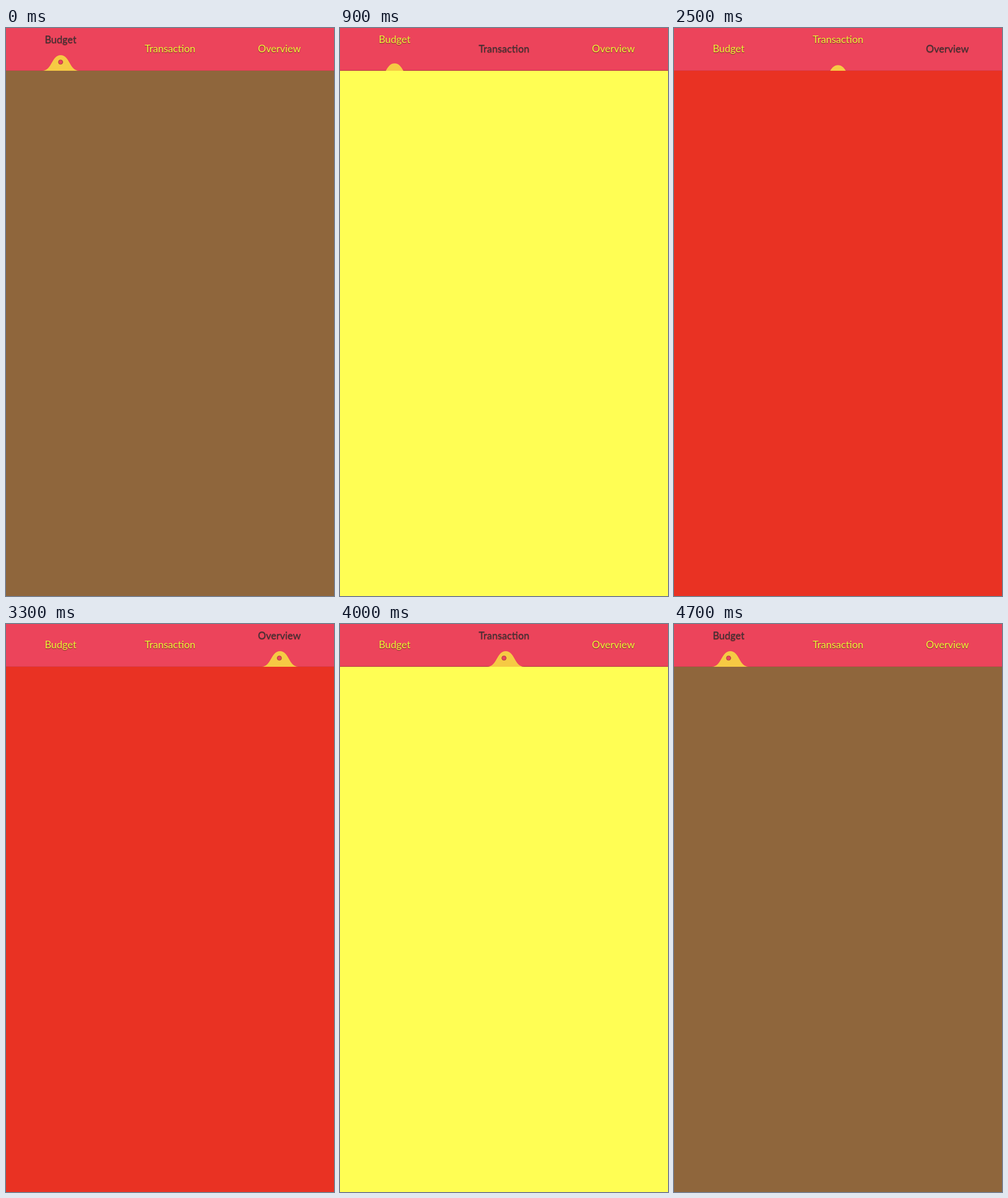
These frames come from a looping animation (569x983 px, 4.8 s). An HTML page:

```html
<!DOCTYPE html>
<html lang="en">
<head>
<meta charset="utf-8">
<title>Tab bar</title>
<style>
  html, body { margin: 0; width: 100%; height: 100%; overflow: hidden; }
  svg { display: block; width: 569px; height: 983px; }
  text {
    font: 17.5px Lato, "Open Sans", sans-serif;
    text-anchor: middle;
    text-shadow: 0 1px 1px rgba(60, 30, 10, .7);
  }
</style>
</head>
<body>
<svg viewBox="0 0 569 983">
  <clipPath id="bar"><rect width="569" height="74"/></clipPath>
  <rect id="page" width="569" height="983"/>
  <rect width="569" height="74" fill="#ec445b"/>
  <rect id="edge" y="73" width="569" height="1" fill="#7d2a34"/>
  <g clip-path="url(#bar)">
    <path id="hump" d="M-32 74C-15 74-16 47 0 47S15 74 32 74Z" fill="#f6ca44"/>
  </g>
  <circle id="dot" r="3.8" fill="#ec445b" stroke="#a8433f"/>
  <g id="labels"></g>
</svg>
<script>
const LOOP = 4800;
const tabs = [
  { name: 'Budget', x: 94.7, page: '#8f663c' },
  { name: 'Transaction', x: 284.5, page: '#fffe54' },
  { name: 'Overview', x: 474.2, page: '#e93223' }
];
const taps = [
  { at: 860, from: 0, to: 1 },
  { at: 2449, from: 1, to: 2 },
  { at: 3310, from: 2, to: 1 },
  { at: 4010, from: 1, to: 0 }
];

const $ = id => document.getElementById(id);
const labels = tabs.map(tab => {
  const el = document.createElementNS('http://www.w3.org/2000/svg', 'text');
  el.textContent = tab.name;
  el.setAttribute('x', tab.x);
  return $('labels').appendChild(el);
});

const span = (t, start, length) => Math.min(1, Math.max(0, (t - start) / length));
const easeOut = p => 1 - (1 - p) ** 2;
const elastic = p => p <= 0 ? 0 : p >= 1 ? 1 :
  1 + 2 ** (-10 * p) * Math.sin((p - .075) * 2 * Math.PI / .3);

function draw(time) {
  // Before the first tap, the last one of the previous round is still settling.
  if (time < taps[0].at) time += LOOP;
  const tap = taps.findLast(item => item.at <= time);
  const t = time - tap.at;
  const from = tabs[tap.from], to = tabs[tap.to];

  $('page').setAttribute('fill', to.page);
  $('edge').setAttribute('opacity', tap.to === 1 ? .6 : .2);

  // Sink at the old tab, spring across, rise at the new one.
  const x = from.x + (to.x - from.x) * elastic(span(t, 120, 1000));
  const sunk = 30 * (easeOut(span(t, 0, 150)) - easeOut(span(t, 270, 230)));
  $('hump').setAttribute('transform', `translate(${x} ${sunk})`);
  $('dot').setAttribute('transform',
    `translate(${to.x} 59) scale(${easeOut(span(t, 430, 170))})`);

  const fall = easeOut(span(t, 100, 250));
  const rise = easeOut(span(t, 250, 250));
  labels.forEach((el, i) => {
    const lift = i === tap.to ? rise : i === tap.from ? 1 - fall : 0;
    el.setAttribute('y', 42 - 16 * lift);
    el.setAttribute('fill', i === tap.to ? '#43313a' : '#f4f43c');
  });
}

const began = performance.now();
function tick() {
  draw((performance.now() - began) % LOOP);
  requestAnimationFrame(tick);
}
tick();
</script>
</body>
</html>
```
